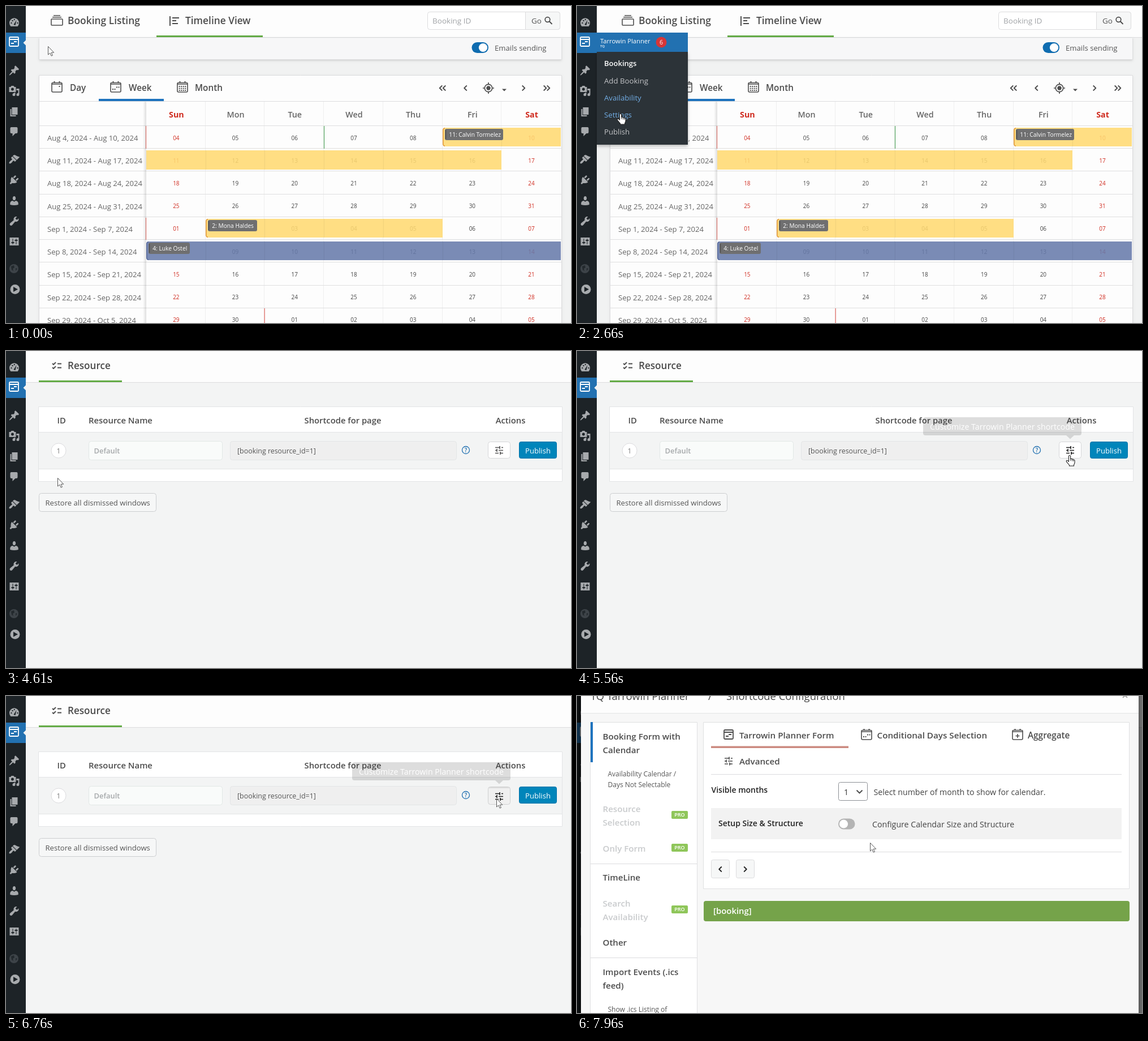
Recreate the animation shown at these times as an HTML page with a canvas. Size 999x560 px, loop 8 s.

```html
<!DOCTYPE html>
<html lang="en">
<head>
<meta charset="utf-8">
<title>Booking admin tour</title>
<style>
html, body { margin: 0; width: 100%; height: 100%; overflow: hidden; background: #f1f2f2; }
canvas { display: block; width: 999px; height: 560px; }
</style>
</head>
<body>
<canvas id="stage" width="999" height="560"></canvas>
<script>
const LOOP = 8000;
const PRODUCT = 'Tarrowin Planner';
const INK = '#4c4c4c';
const canvas = document.getElementById('stage');
let g = canvas.getContext('2d');

// ---------- drawing helpers ----------
function text(s, x, y, size = 13, color = '#555', weight = 400, align = 'left') {
  g.font = `${weight} ${size}px "Open Sans", "Noto Sans", sans-serif`;
  g.fillStyle = color;
  g.textAlign = align;
  g.fillText(s, x, y);
}
function rect(x, y, w, h, color) {
  g.fillStyle = color;
  g.fillRect(x, y, w, h);
}
function box(x, y, w, h, r, fill, line) {
  g.beginPath();
  g.roundRect(line ? x + .5 : x, line ? y + .5 : y, line ? w - 1 : w, line ? h - 1 : h, r);
  if (fill) { g.fillStyle = fill; g.fill(); }
  if (line) { g.strokeStyle = line; g.lineWidth = 1; g.stroke(); }
}
function disc(x, y, r, fill, line, width = 1) {
  g.beginPath();
  g.arc(x, y, r, 0, 7);
  if (fill) { g.fillStyle = fill; g.fill(); }
  if (line) { g.strokeStyle = line; g.lineWidth = width; g.stroke(); }
}
function shape(d, x, y, fill, line, width = 1.5) {
  const p = new Path2D(d);
  g.save();
  g.translate(x, y);
  g.lineJoin = 'round';
  if (fill) { g.fillStyle = fill; g.fill(p, 'evenodd'); }
  if (line) { g.strokeStyle = line; g.lineWidth = width; g.stroke(p); }
  g.restore();
}
function shadow(color, blur, dy, draw) {
  g.save();
  g.shadowColor = color;
  g.shadowBlur = blur;
  g.shadowOffsetY = dy;
  draw();
  g.restore();
}

// ---------- icons ----------
function calendarIcon(x, y, dots) {
  shape('M3 2.500H17Q19 2.500 19 4.500V17Q19 19 17 19H3Q1 19 1 17V4.500Q1 2.500 3 2.500ZM1 5H19', x, y, null, INK, 1.6);
  rect(x + 4.5, y, 2, 3, INK);
  rect(x + 13.5, y, 2, 3, INK);
  for (const [dx, dy] of dots) rect(x + dx, y + dy, 2, 2, INK);
}
const DAY = [[13.5, 8]];
const WEEK = [[4, 13], [7.5, 13], [11, 9.5], [14.5, 9.5]];
const MONTH = [8, 11.5, 15].flatMap(y => [3.7, 7.2, 10.7, 14.2].map(x => [x, y]));

function tuneIcon(x, y, color) {
  shape('M-7-5H1M4-5H7M1-7.5V-2.5M-7 0H-4M-1 0H7M-4-2.5V2.5M-7 5H-1M2 5H7M2 2.5V7.5', x, y, null, color, 1.7);
}
function chevron(x, y, dir, color = INK) {
  shape(`M${-2.3 * dir}-4.5L${2.3 * dir} 0L${-2.3 * dir} 4.5`, x, y, null, color, 1.8);
}
function formIcon(x, y, color) {
  shape('M-8-6.5Q-8-8-6.5-8H6.5Q8-8 8-6.5V6.5Q8 8 6.5 8H-6.5Q-8 8-8 6.5ZM-8-4H8M0 0H5M-5 3H0', x, y, null, color, 1.8);
}
function toggle(x, y, on, color) {
  box(x, y, 29.5, 19, 9.5, color);
  disc(on ? x + 20 : x + 9.5, y + 9.5, 7.6, '#fff');
}

// ---------- side menu ----------
function sidebar(open) {
  rect(0, 0, 35, 560, '#1d2327');
  rect(0, 47, 35, 36, '#2271b1');
  formIcon(14, 63, '#fff');
  const icon = (y, d) => shape(d, 14.5, y, '#a7aaad');
  // gauge, pin, media, pages
  icon(29, 'M-6.200 7A8.500 8.800 0 1 1 6.200 7ZM-1 4L4-4L2 5ZM-6 0h2v2h-2ZM-4-4h2v2h-2ZM-.7-6h2v2h-2ZM5 0h2v2h-2Z');
  icon(114, 'M.4-7L2.300-8.800 8.600-2.500 6.800-.6Q5-1.500 3.400-.3L2.600 .5Q1.500 2 2.300 3.900L.4 5.700-2 3.300-4.800 6.100Q-8 9-8.600 8.400T-6.300 4.600L-3.500 1.800-5.900-.6-4.100-2.500Q-2-1.500-.7-2.800L.1-3.600Q1.300-5 .4-7Z');
  icon(150, 'M3 2V-7H.3L-1-9H-5L-6.300-7H-9V2ZM-3-5.500a2.500 2.500 0 1 1-.1 0ZM4-4H9V6.500a2.500 2.500 0 1 1-2-2.450V-1H4ZM0 4V3H2V6.500a2.500 2.500 0 1 1-2-2.450Z');
  icon(187, 'M-4 5V-8H6V5ZM-5 6H3V8H-7V-5H-5Z');
  // comment, brush, plug
  icon(222, 'M-5-8H4Q6-8 6-6V1Q6 3 4 3H2L-3 8V3H-5Q-7 3-7 1V-6Q-7-8-5-8Z');
  icon(271, 'M4.500 1.100L-2.600-6-1.100-7.500Q.5-8.500 2.400-7.200T9.800-4.200ZM3.800 1.800L-3.300-5.300-5.100-3.500Q-5.700-2.800-5.100-2.100L-4-1.100Q-3.500-.3-4 .4L-7.200 2.900Q-10 6-8.600 7.100T-4.400 5.700L-1.900 2.500Q-1.200 1.900-.5 2.500L.6 3.500Q1.300 4.100 2 3.500Z');
  icon(307, 'M3.100-5.600L-.1-2.400-2-4.300 1.200-7.500Q2-8 2.800-7.200T3.100-5.600ZM-4.900-3.900L-4-5 5 4 3.800 4.900Q2.500 6 0 6H-3.900L-5.100 7.300Q-6.200 8-7.200 7.300T-7.200 5.100L-6 3.900V0Q-5.900-2.900-4.900-3.900ZM2.400 .1L5.600-3.100Q6.300-3.600 7.200-2.800T7.500-1.300L4.200 2Z');
  // person, wrench, sliders
  icon(344, 'M0-.7Q-2.700-1-2.700-4.200-2.500-8 0-8T2.700-4.200Q2.500-1 0-.7ZM0 1.800L2.700 0Q7 .5 7.200 4.500V7Q0 9-7.200 7V4.500Q-7 .5-2.800 0Z');
  icon(380, 'M6.700-.2Q4.500 1.800 1.700 .8L-3.700 7.300Q-5.500 8.700-7.300 7.300-8.700 5.500-7.300 3.700L-.7-1.700Q-1.700-4.500 .3-6.700 2.300-8.500 5-7.700L2.100-4.800 4.900-2 7.800-4.900Q8.500-2 6.700-.2Z');
  icon(416, 'M-8-7H8V7H-8ZM-3-5V1H-5V3H-3V5H-2V3H0V1H-2V-5ZM3-5V-3H1V-1H3V5H4V-1H6V-3H4V-5Z');
  disc(14, 464, 8, '#3d4348');
  shape('M-5-4L0-6L1-2L-2 0L-1 4L-4 2ZM3-1L6 0L3 4Z', 14, 464, '#23292d');
  disc(16, 500.5, 8.5, '#a7aaad');
  shape('M-3-4.500L5 0L-3 4.500Z', 16, 500.5, '#1d2327');
  if (!open) shape('M4-4.500L-.5 0L4 4.500Z', 31, 65, '#f1f2f2');
}

// label, baseline, highlighted from, until
const LINKS = [
  ['Add Booking', 136.5, 2440, 2580],
  ['Availability', 166.5, 2510, 2720],
  ['Settings', 197, 2590, 2790],
  ['Publish', 227, 2720, 4610],
];
function flyout(t) {
  shadow('rgba(0,0,0,.25)', 5, 3, () => rect(35, 81, 161, 164, '#2c3338'));
  rect(35, 47, 161, 34, '#2271b1');
  text(PRODUCT, 41, 66, 11.2, '#fff');
  text('TQ', 41, 73, 6, '#fff', 600);
  disc(149, 64, 9.5, '#d63638');
  text('6', 149, 68, 10.5, '#fff', 400, 'center');
  text('Bookings', 48, 106, 13, '#fff', 600);
  for (const [name, y, from, to] of LINKS)
    text(name, 48, y, 13.2, t >= from && t < to ? '#72aee6' : '#c3c4c7');
}

// ---------- timeline page ----------
const COL = i => 248 + i * 104.7;
const ROW = i => 212 + i * 40.22;
const DAYS = ['Sun', 'Mon', 'Tue', 'Wed', 'Thu', 'Fri', 'Sat'];
const RED = '#cf2a1e';
const YELLOW = 'rgba(255,218,113,.87)';
const BLUE = 'rgba(103,122,170,.87)';

const dayAt = n => new Date(Date.UTC(2024, 7, 4 + n));
const dateLabel = d =>
  d.toLocaleDateString('en-US', { month: 'short', day: 'numeric', year: 'numeric', timeZone: 'UTC' });

function topBar() {
  rect(35, 0, 964, 560, '#f1f2f2');
  rect(35, 0, 964, 55, '#fdfdfd');
  rect(35, 55, 964, 1, '#dcdcde');
}
function bar(row, from, to, color, edge) {
  const x = Math.round(COL(from)), y = Math.round(ROW(row)) + 3;
  const w = Math.round(COL(to)) - x, h = edge ? 33 : 34;
  g.beginPath();
  g.roundRect(x, y, w, h, edge ? [5, 0, 0, 5] : 0);
  g.fillStyle = color;
  g.fill();
  if (edge) shape('M4 .7Q.8 .7 .8 5V28Q.8 32.300 4 32.300', x, y, null, edge, 1.6);
  for (let c = from + 1; c < to; c++) rect(Math.round(COL(c)), y, 1, h, 'rgba(0,0,0,.05)');
}
function chip(s, x, y, w) {
  box(x, y, w, 20, 3, '#6f6f70');
  rect(x + 1, y + 2, 1.3, 16, '#4f4f50');
  text(s, x + 7.3, y + 14, 10.2, '#fff');
}
function timelinePage() {
  topBar();

  shape('M-9-2H9Q10-2 10-1V8Q10 9 9 9H-9Q-10 9-10 8V-1Q-10-2-9-2ZM-8-5.200H8M-6-8.300H6', 90, 25, null, INK, 1.6);
  text('Booking Listing', 109, 32, 17.4, INK, 600);
  shape('M0-8V9M4-5H16M4 0H11M4 5H14', 290, 26, null, INK, 1.9);
  text('Timeline View', 317, 32, 17.3, INK, 600);
  rect(266, 52, 188, 3, '#63ab45');
  box(745, 10, 235, 32, 4, '#fff', '#dcdcde');
  box(918, 10, 62, 32, [0, 4, 4, 0], '#f6f7f7', '#dcdcde');
  text('Booking ID', 754, 31, 13.5, '#a0a3a6');
  text('Go', 929, 31, 13.5, '#555');
  disc(957.5, 24, 4.3, null, INK, 1.7);
  shape('M0 0L5 5', 960.5, 27, null, INK, 2);

  shadow('rgba(0,0,0,.18)', 4, 1, () => rect(59, 57, 923, 38, '#f7f7f8'));
  rect(35, 50, 24, 5, '#fdfdfd');
  box(58, 56, 925, 39, 0, null, '#dfe0e1');
  rect(58, 56, 925, 1, '#f1f2f2');
  toggle(823.5, 64, true, '#0f6cb0');
  text('Emails sending', 864, 79, 13.15, '#555');

  shadow('rgba(0,0,0,.12)', 4, 1, () => rect(59, 123, 923, 450, '#fff'));
  box(58, 122, 925, 460, 0, '#fdfdfd', '#dcdcde');
  calendarIcon(80, 133, DAY);
  calendarIcon(184, 133, WEEK);
  calendarIcon(302, 133, MONTH);
  text('Day', 113, 150, 15.3, INK, 600);
  text('Week', 217, 150, 15.3, INK, 600);
  text('Month', 334, 150, 15.3, INK, 600);
  rect(59, 168, 923, 1, '#dcdcde');
  rect(164, 164, 115, 4, '#1e73be');
  for (const [x, dir] of [[769, -1], [775, -1], [812.5, -1], [915, 1], [953, 1], [959, 1]]) chevron(x, 145, dir);
  disc(853, 145, 6.7, null, INK, 1.7);
  disc(853, 145, 3.7, INK);
  shape('M0-10V-7M0 7V10M-10 0H-7M7 0H10', 853, 145, null, INK, 1.7);
  shape('M-4-1.500H4L0 2.500Z', 881, 148, INK);

  for (let c = 0; c < 7; c++) {
    if (c) rect(Math.round(COL(c)) - 1, 169, 1, 391, '#efefef');
    text(DAYS[c], COL(c + .5) + 1, 196.5, 14.3, c % 6 ? '#666' : RED, c % 6 ? 600 : 700, 'center');
  }
  for (let r = 0; r < 9; r++) {
    const y = ROW(r);
    rect(59, Math.round(y) - 1, 923, 1, '#dfdfe0');
    text(`${dateLabel(dayAt(r * 7))} - ${dateLabel(dayAt(r * 7 + 6))}`, 73, y + 26, 13.1, '#666');
    for (let c = 0; c < 7; c++) {
      const num = String(dayAt(r * 7 + c).getUTCDate()).padStart(2, '0');
      text(num, COL(c + .5) + .5, y + 24.5, 10, c % 6 ? '#444' : RED, 400, 'center');
    }
  }
  const fade = g.createLinearGradient(242, 0, 248, 0);
  fade.addColorStop(0, 'rgba(0,0,0,0)');
  fade.addColorStop(1, 'rgba(0,0,0,.12)');
  rect(242, 169, 6, 391, fade);

  rect(247, 212, 1, 40, '#cf5a50');
  rect(247, 374, 1, 39, '#cf5a50');
  rect(456.5, 534, 1.3, 26, '#e0706a');
  rect(562, 212, 1, 40, '#3c9a4a');

  bar(0, 5, 7, YELLOW, '#e39a3c');
  bar(1, 0, 6, YELLOW);
  bar(4, 1, 5, YELLOW, '#e39a3c');
  bar(5, 0, 7, BLUE, '#596b9d');
  chip('11: Calvin Tormelez', 776, 217, 103);
  chip('2: Mona Haldes', 357, 378, 87);
  chip('4: Luke Ostel', 252, 418, 73);
}

// ---------- resource page ----------
const tip = document.createElement('canvas');
tip.width = 281;
tip.height = 40;
function paintTip() {
  const main = g;
  g = tip.getContext('2d');
  box(0, 0, 280, 32, 4, '#333');
  shape('M-7 0H7L0 6.500Z', 260, 32, '#333');
  text(`Customize ${PRODUCT} shortcode`, 140, 21.5, 14.2, '#fff', 400, 'center');
  g = main;
}
function tipAlpha(t) {
  if (t < 5560 || t >= 6830) return 0;
  if (t < 6620) return Math.min(1, .16 + .26 * Math.floor((t - 5560) / 67));
  return [.8, .45, .16][Math.floor((t - 6620) / 70)];
}
function resourcePage(t) {
  topBar();
  rect(35, 56, 964, 504, '#f3f4f4');
  shape('M-8-4L-6-2L-2-6M-8 3L-6 5L-2 1M1-3.500H8M1 3.500H8', 90, 26, null, INK, 1.8);
  text('Resource', 109, 32, 17.1, INK, 600);
  rect(58, 52, 147, 3, '#63ab45');

  box(57, 98, 927, 133, 0, '#fff', '#e2e4e5');
  rect(58, 143, 925, 66, '#e2e4e5');
  rect(58, 144, 925, 64, '#f3f4f4');
  text('ID', 90.5, 128, 14.7, INK, 600);
  text('Resource Name', 146, 128, 14.9, INK, 600);
  text('Shortcode for page', 595.5, 128, 14.8, INK, 600, 'center');
  text('Actions', 892, 128, 14.8, INK, 600, 'center');
  disc(93, 176, 13, '#fff', '#dcdcde');
  text('1', 93, 180.5, 12, '#777', 400, 'center');
  box(146, 159, 237, 34, 4, '#f9fbfa', '#e2e8e6');
  text('Default', 155.5, 181, 12.9, '#a5a8aa', 600);
  box(396, 159, 401, 34, 4, '#efefef', '#e3e5e6');
  text('[booking resource_id=1]', 409, 181, 12.4, '#555', 500);
  disc(813, 175, 6.5, null, '#2271b1', 1.3);
  text('?', 813, 179, 10, '#2271b1', 600, 'center');

  const down = t >= 6690, over = t >= 5490;
  box(852, 160, 40, down ? 32 : 30, 4, down ? '#f0f0f0' : '#fff', down ? '#cfd0d1' : '#d5d6d8');
  if (down) rect(854, 161, 36, 2, '#dcdcdc');
  tuneIcon(872, down ? 177.5 : 175.5, over ? '#222' : '#555');
  box(907, 160, 67, 30, 3, '#0085ba', '#0073aa');
  text('Publish', 940.5, 180.5, 13.1, '#fff', 400, 'center');
  box(58, 251, 208, 33, 4, '#f6f7f7', '#ccced0');
  text('Restore all dismissed windows', 69.5, 272.5, 13.1, '#555');

  const a = tipAlpha(t);
  if (a) {
    g.globalAlpha = a;
    g.drawImage(tip, 612, 117);
    g.globalAlpha = 1;
  }
}

// ---------- dialog ----------
function lines(list, x, size, weight, color) {
  for (const [s, y] of list) text(s, x, y, size, color, weight);
}
function pro(y) {
  box(167, y, 29, 14, 2, '#8fc65a');
  text('PRO', 181.5, y + 10.3, 9, '#fff', 600, 'center');
}
function dialog() {
  rect(0, 0, 999, 560, 'rgba(0,0,0,.5)');
  shadow('rgba(0,0,0,.5)', 15, 5, () => rect(7, -30, 986, 640, '#f7f7f7'));
  rect(7, 0, 986, 30, '#fdfdfd');
  rect(7, 30, 986, 1, '#e3e4e5');
  text(`TQ ${PRODUCT}`, 24, 7, 18.4, '#444');
  text('/', 232, 7, 18.4, '#444');
  text('Shortcode Configuration', 264, 7, 18.4, '#444');
  shape('M-4-4L4 4M4-4L-4 4', 969, -1, null, '#aaa', 2);

  box(23, 46, 190, 530, 0, '#fff', '#dfe0e1');
  rect(24, 46, 4, 71, '#1e73be');
  rect(24, 296, 188, 1, '#dcdcde');
  rect(24, 462, 188, 1, '#dcdcde');
  lines([['Booking Form with', 76.5], ['Calendar', 100.5], ['TimeLine', 326], ['Other', 441],
    ['Import Events (.ics', 492.5], ['feed)', 517]], 45.5, 15.1, 600, INK);
  lines([['Resource', 205], ['Selection', 229], ['Only Form', 274.5], ['Search', 371.5],
    ['Availability', 395.5]], 45.5, 15.1, 600, '#c9cbcd');
  lines([['Availability Calendar /', 142], ['Days Not Selectable', 161], ['Show .ics Listing of', 558]],
    54.5, 12, 400, '#555');
  [203, 261, 370].forEach(pro);

  box(223, 46, 754, 295, 0, '#fff', '#dfe0e1');
  formIcon(268, 68, INK);
  text(`${PRODUCT} Form`, 287, 75, 15.2, INK, 600);
  calendarIcon(502, 58, WEEK);
  text('Conditional Days Selection', 530.5, 75, 15.2, INK, 600);
  calendarIcon(769, 58, []);
  shape('M-3.500 0H3.500M0-3.500V3.500', 779, 70.5, null, INK, 1.6);
  text('Aggregate', 797, 75, 15.3, INK, 600);
  rect(237, 88.5, 243, 3.5, '#cb8a80');
  tuneIcon(268, 115, INK);
  text('Advanced', 287, 120.5, 15.2, INK, 600);
  rect(237, 138, 726, 1, '#dcdcde');
  text('Visible months', 237.5, 170.5, 14, '#222', 600);
  box(462, 152, 52, 33, 3, '#fff', '#8c8f94');
  text('1', 472, 175, 14, '#333');
  shape('M-5-2.500L0 2.500L5-2.500', 499.5, 169, null, INK, 1.9);
  text('Select number of month to show for calendar.', 524.5, 175, 14.2, '#444');
  rect(237, 198, 726, 55, '#f2f2f2');
  text('Setup Size & Structure', 250, 230, 14, '#222', 600);
  toggle(462, 216.5, false, '#b4b4b4');
  text('Configure Calendar Size and Structure', 522, 232, 14.2, '#444');
  rect(237, 275, 726, 1, '#dcdcde');
  box(237, 289, 33, 33, 3, '#f6f7f7', '#dcdcde');
  box(281, 289, 33, 33, 3, '#f6f7f7', '#dcdcde');
  chevron(253.5, 306, -1, '#222');
  chevron(297.5, 306, 1, '#222');
  box(224, 362, 753, 36, 4, '#75a34a');
  text('[booking]', 241, 385, 14.9, '#fff', 600);
}

// ---------- pointer ----------
// start, end, number of positions, evenly timed way points
const MOVES = [
  [1500, 1980, 8, [[62, 71], [34, 68], [20, 64], [14, 62]]],
  [2380, 2930, 9, [[26, 64], [86, 124], [77, 190], [74, 221], [68, 209]]],
  [3530, 3600, 2, [[74, 212], [79, 215]]],
  [4610, 5360, 12, [[91, 224], [190, 246], [480, 262], [770, 252], [864, 229]]],
  [5430, 5490, 2, [[868, 208], [871, 184]]],
  [6690, 6690, 1, [[867, 181]]],
  [7480, 7960, 8, [[862, 184], [780, 232], [640, 284], [545, 288], [518, 259]]],
];
function pointerAt(t) {
  let pos = [74, 71];
  for (const [from, to, n, pts] of MOVES) {
    if (t < from) break;
    const step = n > 1 ? Math.floor((t - from) / (to - from) * (n - 1) + .05) : 0;
    const k = Math.min(1, n > 1 ? step / (n - 1) : 1) * (pts.length - 1);
    const i = Math.min(Math.floor(k), Math.max(0, pts.length - 2));
    const a = pts[i], b = pts[i + 1] || a;
    pos = a.map((v, j) => v + (b[j] - v) * (k - i));
  }
  return pos;
}
const ARROW = 'M.5 .5V15L3.800 12L6.200 17.200L8.400 16.200L6.100 11.200H10.700Z';
const HAND = 'M-1.600 2Q-1.600 .5 0 .5T1.600 2V6.500Q3.800 5.800 4.300 7.200Q6.200 6.600 6.700 8Q9 7.700 9 10V13Q9 15 7.500 17V19H-.5V17.500L-5.500 11.700Q-6.300 10-5 9.300Q-3.600 9-1.600 11.500Z';
function pointer(t) {
  const [x, y] = pointerAt(t);
  const hand = (t >= 1630 && t < 4610) || (t >= 5490 && t < 6690);
  shape(hand ? HAND : ARROW, x, y, '#fff', hand ? '#222' : '#444', hand ? 1.1 : .9);
  if (hand) shape('M1.600 6.500V10M4.300 7.200V10.500M6.700 8V11', x, y, null, '#222', .9);
}

// ---------- playback ----------
function draw(t) {
  const open = t >= 1630 && t < 4610;
  if (t < 4610) timelinePage(); else resourcePage(t);
  sidebar(open);
  if (open) flyout(t);
  if (t >= 6830) {
    g.globalAlpha = t < 6890 ? .5 : 1;
    dialog();
    g.globalAlpha = 1;
  }
  pointer(t);
}
function frame() {
  draw(performance.now() % LOOP);
  requestAnimationFrame(frame);
}
paintTip();
frame();
</script>
</body>
</html>
```
